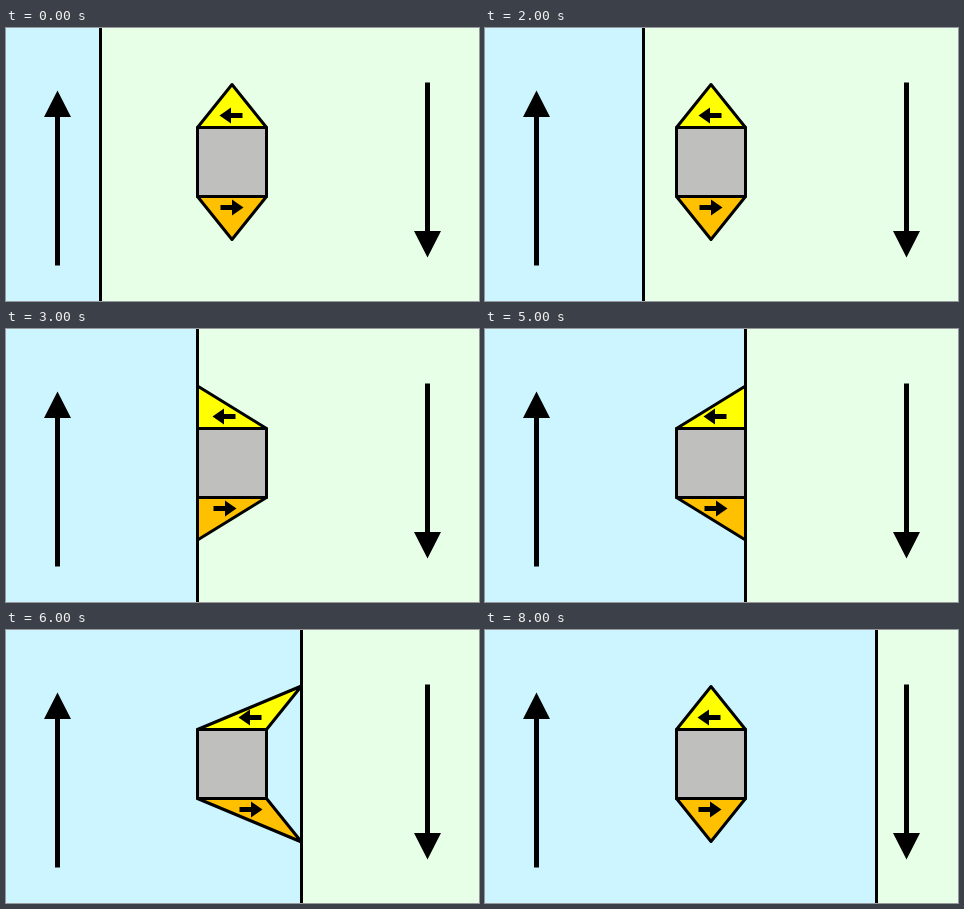
These frames come from a looping animation (473 px wide and 273 px high, 9000 ms). An HTML page:

```html
<!DOCTYPE html>
<html lang="en">
<head>
<meta charset="utf-8">
<title>Domain wall passing an inclusion</title>
<style>
html, body { margin: 0; width: 100%; height: 100%; overflow: hidden; }
svg { display: block; width: 473px; height: 273px; }
.edge { stroke: #000; stroke-width: 3; stroke-linejoin: round; }
</style>
</head>
<body>
<svg viewBox="0 0 473 273">
  <defs>
    <path id="big" d="M0 0L13.5 26.5H2.5V175H-2.5V26.5H-13.5Z"/>
    <path id="small" d="M0 0L11.5 -8V-2.5H23V2.5H11.5V8Z"/>
  </defs>
  <rect width="473" height="273" fill="#e6ffe6"/>
  <rect id="left" height="273" fill="#ccf5ff"/>
  <path id="wall" class="edge"/>
  <path id="top" class="edge" fill="#ff0"/>
  <path id="bottom" class="edge" fill="#ffc000"/>
  <rect class="edge" x="191.5" y="99.5" width="69" height="69" fill="#bfbfbd"/>
  <g id="arrows">
    <use href="#small" x="213.5" y="87.5"/>
    <use href="#small" transform="translate(237.5 179.5) rotate(180)"/>
  </g>
  <use href="#big" x="51.5" y="62.5"/>
  <use href="#big" transform="translate(421.5 229.5) rotate(180)"/>
</svg>
<script>
const STEP = 1000, REST = 226;
// Each pose: wall x, tip x, arrow shift, tip height
const poses = [
  [94.5, REST, 0, 43],
  [126.5, REST, 0, 43],
  [158.5, REST, 0, 43],
  [191.5, 191.5, -7, 42.5],
  [226.5, REST, -1, 43],
  [260.5, 260.5, 5, 42.5],
  [295.5, 295.5, 19, 43.5],
  [329.5, 329, 33, 44],
  [391.5, REST, -1, 43]
];
const set = (id, name, value) => document.getElementById(id).setAttribute(name, value);
let shown = -1;

function draw(now) {
  const i = Math.floor(now / STEP) % poses.length;
  if (i !== shown) {
    const [x, tip, shift, height] = poses[shown = i];
    set("left", "width", x);
    set("wall", "d", `M${x} -2V275`);
    set("top", "d", `M191.5 99.5L${tip} ${99.5 - height}L260.5 99.5Z`);
    set("bottom", "d", `M191.5 168.5L${tip} ${168.5 + height}L260.5 168.5Z`);
    set("arrows", "transform", `translate(${shift} 0)`);
  }
  requestAnimationFrame(() => draw(performance.now() - start));
}
const start = performance.now();
draw(0);
</script>
</body>
</html>
```
